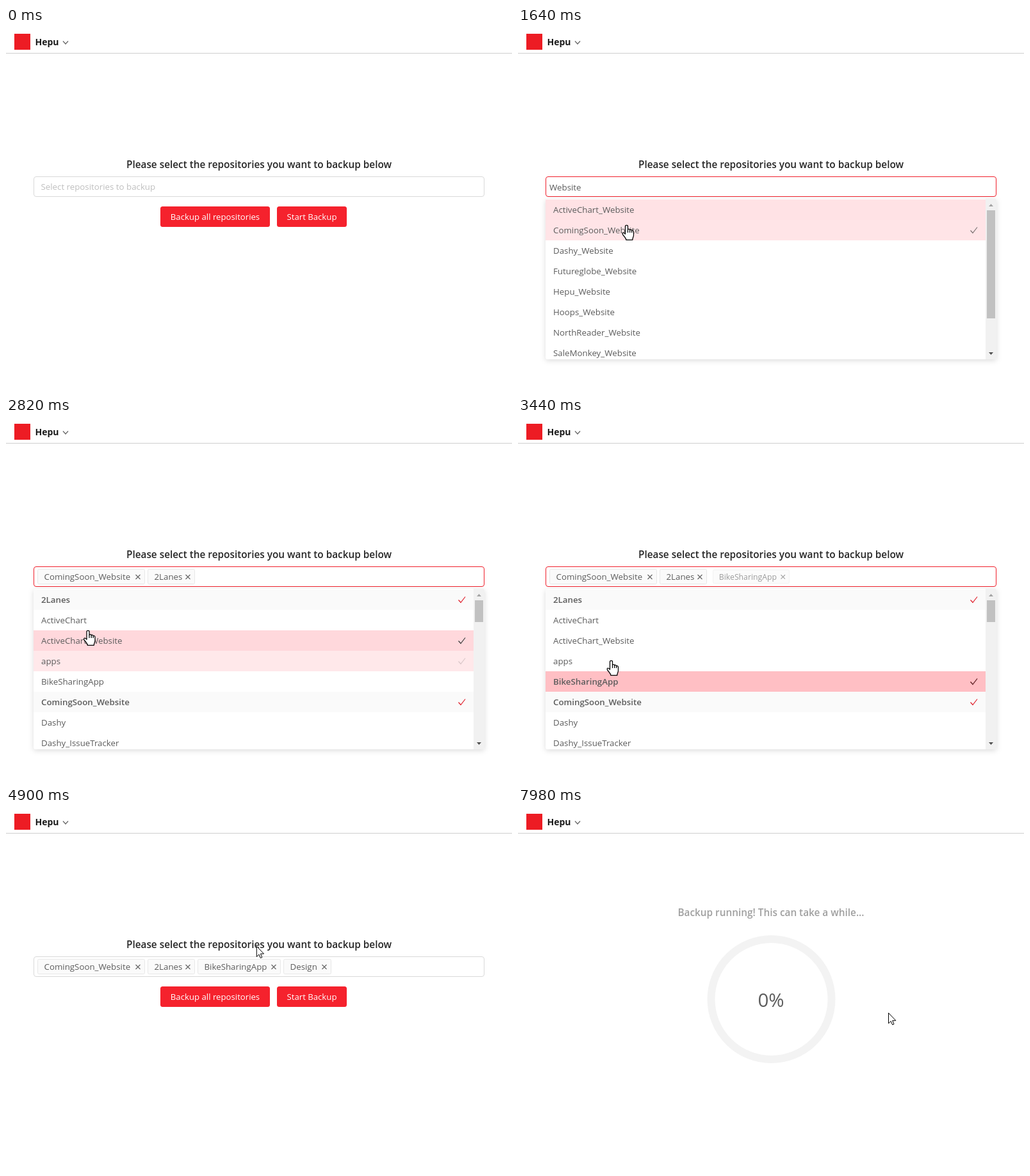
These frames come from a looping animation (790x566 px, 8000 ms). An HTML page:

```html
<!DOCTYPE html>
<html lang="en">
<head>
<meta charset="utf-8">
<title>Repository backup</title>
<style>
html, body { margin: 0; width: 100%; height: 100%; overflow: hidden; background: #fff; }
svg { display: block; width: 790px; height: 566px; }
text { font: 13.3px "Open Sans", "Noto Sans", sans-serif; fill: #5c5c5c; white-space: pre; }
.brand { font-size: 14px; font-weight: 700; fill: #1a1a1a; }
.title { font-size: 15.35px; font-weight: 600; fill: #262626; text-anchor: middle; }
.btn text { font-size: 13.2px; fill: #fff; text-anchor: middle; }
.btn rect { fill: #f5222d; }
.hint { fill: #bfbfbf; }
.percent { font-size: 29.5px; fill: #5c5c5c; text-anchor: middle; }
.line { fill: none; stroke-width: 1.2; }
.bold { font-weight: 600; }
#panel { filter: drop-shadow(0 2px 4px rgba(0, 0, 0, .14)); }
</style>
</head>
<body>
<svg viewBox="0 0 790 566">
  <defs><clipPath id="view"><rect x="43" y="267" width="704" height="251" rx="3"/></clipPath></defs>
  <rect x="13" y="9" width="25" height="25" fill="#ed1c24"/>
  <text class="brand" x="45.5" y="27">Hepu</text>
  <path class="line" stroke="#666" d="M89 20.5 93 25 97 20.5"/>
  <rect y="39" width="790" height="1" fill="#cfcfcf"/>

  <g id="form">
    <text class="title" x="395" y="219">Please select the repositories you want to backup below</text>
    <rect id="field" x="43.5" y="232.5" width="703" height="31" rx="3.5" fill="#fff"/>
    <text id="hint" class="hint" x="54.5" y="253">Select repositories to backup</text>
    <text id="query" x="49" y="254"></text>
    <g id="tags"></g>
    <g class="btn">
      <rect x="241" y="279" width="171" height="32" rx="3.5"/>
      <text x="326.5" y="300">Backup all repositories</text>
      <rect x="423" y="279" width="109" height="32" rx="3.5"/>
      <text x="477.5" y="300">Start Backup</text>
    </g>
    <g id="menu">
      <rect id="panel" x="43" y="267" width="704" height="251" rx="3" fill="#fff"/>
      <g clip-path="url(#view)">
        <g id="rows"></g>
        <rect x="730" y="267" width="17" height="251" fill="#f1f1f1"/>
        <rect id="thumb" x="732" width="13" fill="#c1c1c1"/>
        <path id="up" d="M735 279h7l-3.5-4z"/>
        <path d="M735 507h7l-3.5 4z" fill="#505050"/>
      </g>
    </g>
  </g>

  <g id="run">
    <text id="note" class="title" x="395" y="169">Backup running! This can take a while...</text>
    <circle cx="395.5" cy="299" r="94" fill="none" stroke="#f3f3f3" stroke-width="12"/>
    <text class="percent" x="395" y="311">0%</text>
  </g>

  <g id="arrow" fill="#fff" stroke="#000">
    <path d="M.5.5V16.8L4.2 13.3 6.6 18.9 9 17.9 6.7 12.3H11.8Z"/>
  </g>
  <g id="hand" fill="#fff" stroke="#000" stroke-width="1.25" stroke-linejoin="round">
    <path d="M-2 2.2C-2-.2 2-.2 2 2.2V7.5C2 6 5 6 5.2 7.8 6 6.8 8 7.2 8.2 8.8 9.5 8 11 8.8 11 10.5V16C11 18.5 9.5 19.5 9.2 23.4H-.6C-.8 20-5.5 16.5-6.2 14.2-6.8 12.4-5 11.5-3.8 12.6L-2 14.2Z"/>
    <path fill="none" d="M2 7.5V12M5.2 8V12M8.2 9V12"/>
  </g>
</svg>
<script>
const LOOP = 8000, ROW = 32, TOP = 268;
const OPEN = 470, CLOSE = 4640, PICK = 1780, SCROLL = 3945, START = 5400;
const $ = id => document.getElementById(id);
const clamp = v => Math.max(0, Math.min(1, v));
const mix = (a, b, p) => a + (b - a) * p;
const smooth = p => p * p * (3 - 2 * p);

const names = ['2Lanes', 'ActiveChart', 'ActiveChart_Website', 'apps', 'BikeSharingApp',
  'ComingSoon_Website', 'Dashy', 'Dashy_IssueTracker', 'Dashy_Website', 'Design', 'DodgeOrDie',
  'EscapeTheCore', 'FarmerMan', 'FillIT', 'Futureglobe_Website', 'Hepu_Website',
  'Hoops_Website', 'NorthReader_Website', 'SaleMonkey_Website'];

// name, time picked, left, width, fade time
const picks = [
  ['ComingSoon_Website', PICK, 49, 168, 300],
  ['2Lanes', 2450, 221, 74, 300],
  ['BikeSharingApp', 3260, 299, 130, 300],
  ['Design', 3980, 433, 75, 150]
];

// time, highlighted row, under the pointer
const hovers = [
  [OPEN, '2Lanes', 0], [700, 'ActiveChart_Website', 0],
  [1560, 'ComingSoon_Website', 1], [PICK, 'ActiveChart', 1], [1920, '2Lanes', 1],
  [2530, 'ActiveChart', 1], [2570, 'ActiveChart_Website', 1], [2610, 'apps', 1],
  [2700, 'ActiveChart_Website', 1], [2980, 'apps', 1], [3130, 'BikeSharingApp', 1],
  [SCROLL, 'Design', 1], [4010, 'DodgeOrDie', 1]
];

// time, letters typed
const typed = [[700, 1], [830, 2], [980, 3], [1040, 4], [1090, 5], [1150, 6], [1200, 7]];

// time, x, y, pointer shape
const path = [
  [0, 300, 580, ''], [70, 300, 572, 'arrow'], [400, 192, 246, 'hand'], [470, 190, 242, 'hand'],
  [700, 190, 242, ''], [1500, 190, 242, 'hand'], [1640, 169.5, 308, 'hand'],
  [1800, 168, 311, 'hand'], [2040, 158, 236, 'arrow'], [2200, 150, 181, 'arrow'],
  [2310, 134, 240, 'hand'], [2420, 118, 262, 'hand'], [2490, 118, 264, 'hand'],
  [2640, 130, 358, 'hand'], [2820, 128, 332, 'hand'], [3100, 142, 386, 'hand'],
  [3440, 145.5, 379, 'hand'], [3900, 142, 382, 'hand'], [3970, 133, 366, 'hand'],
  [4020, 132, 366, 'hand'], [4120, 130, 398, 'hand'], [4300, 132, 397, 'hand'],
  [4480, 240, 262, 'arrow'], [4640, 330, 168, 'arrow'], [4760, 334, 170, 'arrow'],
  [5080, 472, 281, 'hand'], [5180, 478, 285, 'hand'], [START, 478, 286, 'arrow'],
  [5570, 520, 340, 'arrow'], [5800, 520, 340, 'arrow'], [6140, 593, 312, 'arrow'],
  [6630, 593, 312, 'arrow'], [7410, 578, 320, 'arrow'], [LOOP, 578, 320, 'arrow']
];

function add(parent, tag, attrs, label) {
  const el = document.createElementNS('http://www.w3.org/2000/svg', tag);
  for (const k in attrs) el.setAttribute(k, attrs[k]);
  if (label) el.textContent = label;
  return parent.appendChild(el);
}

const tick = 'M706.5 284.5 710 288.5 717 279.5';
const rows = names.map(name => {
  const g = add($('rows'), 'g', {});
  return {
    name, g,
    base: add(g, 'rect', { x: 43, y: TOP, width: 687, height: ROW, fill: '#fafafa' }),
    glow: add(g, 'rect', { x: 43, y: TOP, width: 687, height: ROW }),
    label: add(g, 'text', { x: 55, y: 289 }, name),
    red: add(g, 'path', { class: 'line', stroke: '#e0202c', d: tick }),
    dark: add(g, 'path', { class: 'line', stroke: '#3c3c3c', d: tick })
  };
});

const tags = picks.map(([name, at, x, w, time]) => {
  const g = add($('tags'), 'g', {}), c = x + w - 11;
  add(g, 'rect', { x: x + .5, y: 236.5, width: w - 1, height: 23, rx: 2, fill: '#fafafa', stroke: '#e8e8e8' });
  add(g, 'text', { x: x + 10.5, y: 253 }, name);
  add(g, 'path', { class: 'line', stroke: '#666', d: `M${c - 3.5} 245l7 7m0-7l-7 7` });
  return { g, at, time, mid: x + w / 2 };
});

const show = (el, on) => el.setAttribute('visibility', on ? 'inherit' : 'hidden');
const fade = (el, v) => el.setAttribute('opacity', v.toFixed(3));

function drawRows(t) {
  const hit = typed.filter(k => t >= k[0]).pop();
  const query = hit && t < PICK ? 'Website'.slice(0, hit[1]) : '';
  const scroll = t >= SCROLL ? 200 : 0;
  const at = hovers.reduce((n, h, i) => t >= h[0] ? i : n, -1);
  const now = hovers[at], old = hovers[at - 1];
  const since = now ? t - now[0] : 0;
  let n = 0;
  for (const r of rows) {
    const seen = r.name.includes(query);
    show(r.g, seen);
    if (!seen) continue;
    r.g.setAttribute('transform', `translate(0 ${n++ * ROW - scroll})`);
    const pick = picks.find(p => p[0] === r.name);
    const chosen = !!pick && t >= pick[1];
    let glow = 0, mark = 0;
    if (now && now[1] === r.name) {
      glow = clamp(since / 120);
      mark = now[2] * glow;
    } else if (old && old[1] === r.name) {
      glow = 1 - clamp(since / 300);
      mark = old[2] * (1 - clamp(since / 150));
    }
    show(r.base, chosen);
    r.label.setAttribute('class', chosen ? 'bold' : '');
    r.glow.setAttribute('fill', chosen ? '#ffbfc4' : '#ffd8dc');
    fade(r.glow, glow);
    fade(r.red, chosen ? 1 : 0);
    fade(r.dark, chosen ? glow * .8 : mark);
  }
  $('query').textContent = query;
  show($('hint'), !query && t < PICK);
  $('thumb').setAttribute('y', 285 + scroll * 216 / 1600);
  $('thumb').setAttribute('height', query ? 169 : 34);
  $('up').setAttribute('fill', scroll ? '#505050' : '#a3a3a3');
}

function drawForm(t) {
  const open = smooth(clamp((t - OPEN) / 200)) * (1 - smooth(clamp((t - CLOSE) / 110)));
  const stretch = mix(.8, 1, open);
  show($('menu'), open > 0);
  fade($('menu'), open);
  $('menu').setAttribute('transform', `translate(0 ${267 * (1 - stretch)}) scale(1 ${stretch})`);
  const f = clamp((t - 430) / 150) * (1 - clamp((t - CLOSE) / 110));
  $('field').setAttribute('stroke', `rgb(${mix(217, 240, f)},${mix(217, 32, f)},${mix(217, 44, f)})`);
  for (const tag of tags) {
    const p = clamp((t - tag.at) / tag.time), s = mix(.8, 1, p);
    fade(tag.g, p);
    tag.g.setAttribute('transform', `translate(${tag.mid * (1 - s)} ${248 * (1 - s)}) scale(${s})`);
  }
}

function drawPointer(t) {
  const i = Math.max(0, path.findIndex(k => k[0] > t) - 1);
  const [t0, x0, y0, shape] = path[i], [t1, x1, y1] = path[i + 1];
  const p = smooth((t - t0) / (t1 - t0));
  for (const id of ['arrow', 'hand']) {
    show($(id), id === shape);
    $(id).setAttribute('transform', `translate(${mix(x0, x1, p)} ${mix(y0, y1, p)})`);
  }
}

function draw(t) {
  const running = t >= START;
  show($('form'), !running);
  show($('run'), running);
  if (running) {
    fade($('note'), mix(.34, .44, (t - START) / (LOOP - START)));
  } else {
    drawRows(t);
    drawForm(t);
  }
  drawPointer(t);
}

const begin = performance.now();
function frame() {
  draw((performance.now() - begin) % LOOP);
  requestAnimationFrame(frame);
}
frame();
</script>
</body>
</html>
```
